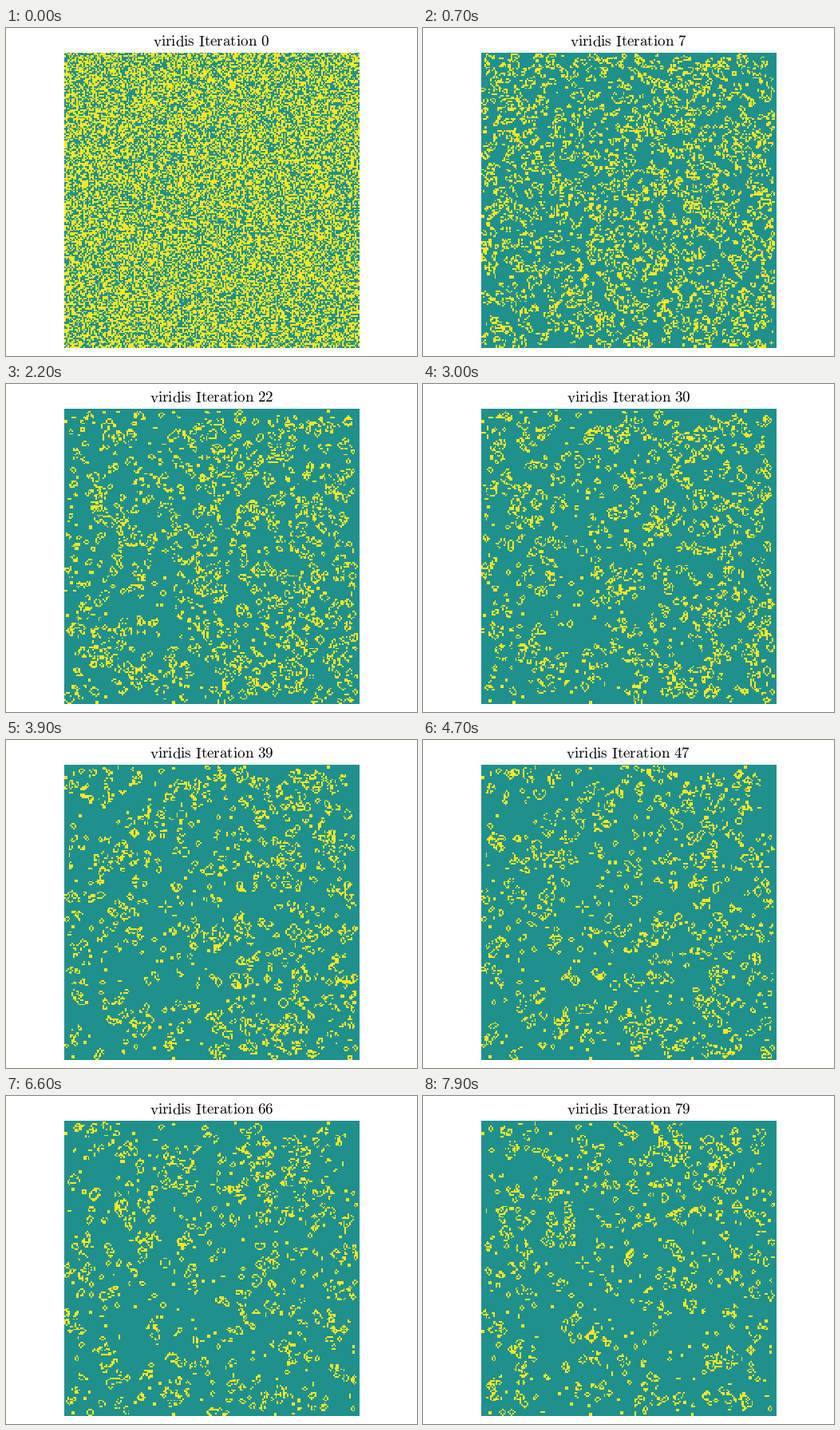
These frames come from a looping animation (515 px wide and 411 px high, 8000 ms). A matplotlib script:

```python
import matplotlib.pyplot as plt
import numpy as np
from matplotlib.animation import FuncAnimation

W, H, DPI = 515, 411, 100
N = 200
STEPS = 80
LEFT, TOP, SIDE = 73, 31, 370
CMAP = "viridis"

plt.rcParams["mathtext.fontset"] = "cm"
plt.rcParams["text.hinting"] = "none"


def evolve(grid):
    """One Game of Life step; the last row and column always stay dead."""
    near = sum(
        np.roll(grid, (dy, dx), (0, 1))
        for dy in (-1, 0, 1)
        for dx in (-1, 0, 1)
        if dy or dx
    )
    new = ((near == 3) | ((grid == 1) & (near == 2))).astype(int)
    new[-1, :] = 0
    new[:, -1] = 0
    return new


def title(step):
    return rf"$\mathrm{{{CMAP}\ Iteration\ {step}}}$"


grids = [np.random.RandomState(0).randint(0, 2, (N, N))]
while len(grids) < STEPS:
    grids.append(evolve(grids[-1]))

fig = plt.figure(figsize=(W / DPI, H / DPI), dpi=DPI, facecolor="white")
ax = fig.add_axes([LEFT / W, 1 - (TOP + SIDE) / H, SIDE / W, SIDE / H])
ax.axis("off")
image = ax.imshow(grids[0], cmap=CMAP, vmin=-1, vmax=1, origin="lower",
                  interpolation="nearest", aspect="auto")
label = fig.text((LEFT + SIDE / 2 - 0.5) / W, 1 - 23 / H, title(0),
                 fontsize=13.75, ha="center", va="baseline", color="black")


def update(step):
    image.set_data(grids[step])
    label.set_text(title(step))
    return image, label


anim = FuncAnimation(fig, update, frames=STEPS, interval=100,
                     repeat=True, repeat_delay=0, blit=False)
plt.show()
```
